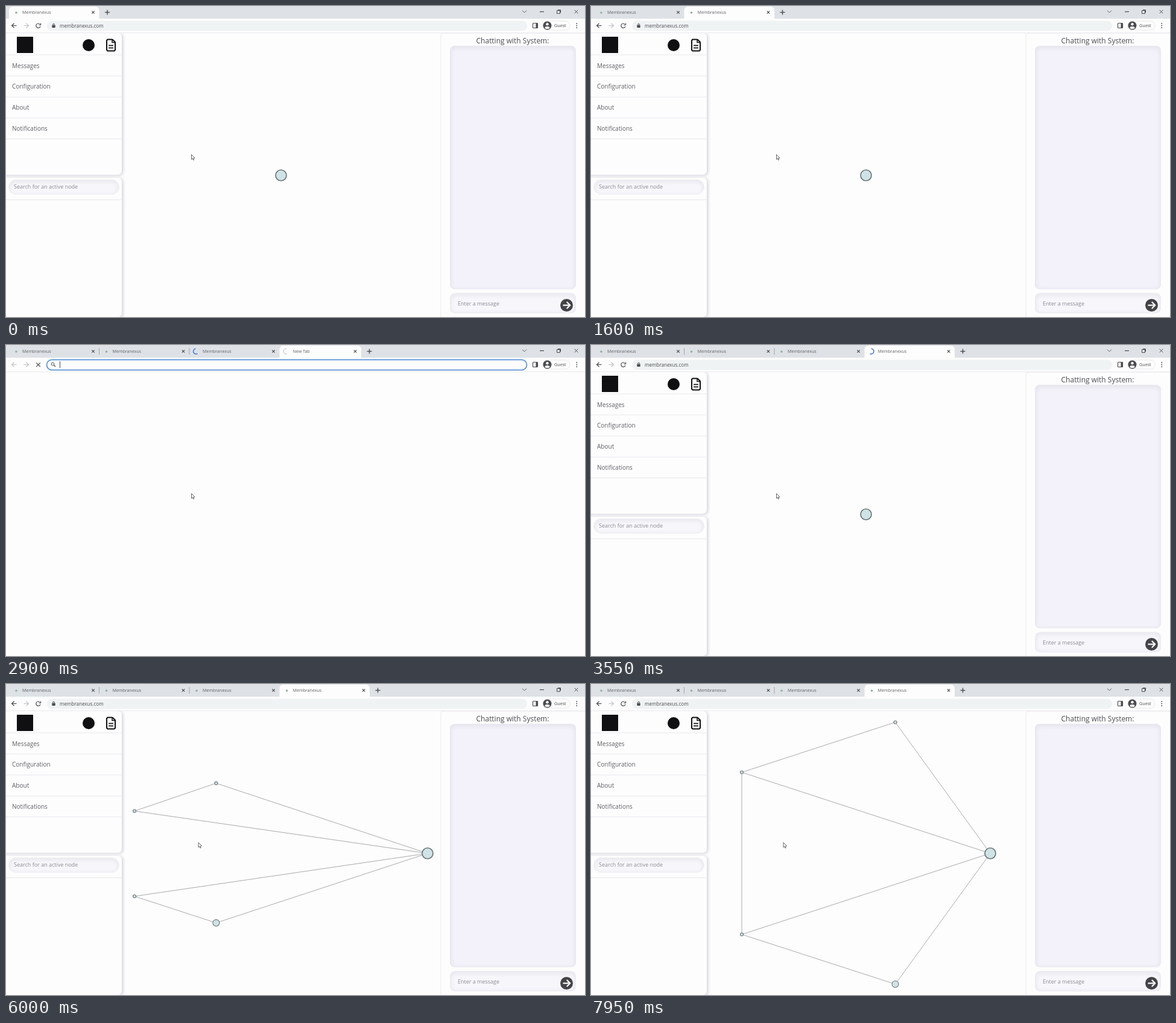
An HTML page with a canvas that plays this animation: 960 by 516 pixels, repeating every 8000 ms.

```html
<!DOCTYPE html>
<html lang="en">
<head>
<meta charset="utf-8">
<title>Browser tabs joining a network</title>
<style>
html, body { margin: 0; width: 100%; height: 100%; overflow: hidden; background: #fdfdfd; }
canvas { display: block; }
</style>
</head>
<body>
<canvas id="stage" width="960" height="516"></canvas>
<script>
const ctx = document.getElementById('stage').getContext('2d');
const LOOP = 8000, TAB = 149.5, TAU = Math.PI * 2;
const PAPER = '#fdfdfd', STRIP = '#dee2e6', FIELD = '#f0f3f4', INK = '#4b4c50', SOFT = '#606166';
const RULE = '#e9e9ee', FAINT = '#c3c4c8', HINT = '#8b8b92', BLACK = '#101012', BLUE = '#4384d0';
const UI = '"Open Sans", sans-serif', ROBOTO = 'Roboto, sans-serif';
const openings = [-3000, 600, 1950, 2800];   // when each tab is opened
const LOAD = 700;                            // from opening a tab to its page

const clamp = v => Math.max(0, Math.min(1, v));
const easeOut = (v, power) => 1 - (1 - clamp(v)) ** power;
const mix = (a, b, k) => a + (b - a) * k;

function text(str, x, y, size, color = INK, font = UI, align = 'left', weight = 400) {
  ctx.font = `${weight} ${size}px ${font}`;
  ctx.textAlign = align;
  ctx.fillStyle = color;
  ctx.fillText(str, x, y);
}
function line(points, color = INK, width = 1) {
  ctx.beginPath();
  for (let i = 0; i < points.length; i += 2) ctx.lineTo(points[i], points[i + 1]);
  ctx.strokeStyle = color;
  ctx.lineWidth = width;
  ctx.stroke();
}
function paint(fill, stroke, width = 1) {
  if (fill) { ctx.fillStyle = fill; ctx.fill(); }
  if (stroke) { ctx.strokeStyle = stroke; ctx.lineWidth = width; ctx.stroke(); }
}
function circle(x, y, r, fill, stroke, width) {
  ctx.beginPath();
  ctx.arc(x, y, r, 0, TAU);
  paint(fill, stroke, width);
}
function box(x, y, w, h, r, fill, stroke, width) {
  ctx.beginPath();
  ctx.roundRect(x, y, w, h, r);
  paint(fill, stroke, width);
}
function arc(x, y, r, from, to, color, width) {
  ctx.beginPath();
  ctx.arc(x, y, r, from, to);
  paint(null, color, width);
}
function cross(x, y, r, width = 1.2) {
  line([x - r, y - r, x + r, y + r], INK, width);
  line([x - r, y + r, x + r, y - r], INK, width);
}
function shadowed(color, blur, dx, dy, draw) {
  ctx.save();
  Object.assign(ctx, { shadowColor: color, shadowBlur: blur, shadowOffsetX: dx, shadowOffsetY: dy });
  draw();
  ctx.restore();
}
function sunkenBox(x, y, w, h, r, fill) {
  box(x, y, w, h, r, fill);
  ctx.save();
  ctx.clip();
  shadowed('#c4c4d0', 7, 0, 2, () => box(x - 1, y - 1, w + 2, h + 2, r, null, '#dcdce6', 2));
  ctx.restore();
}

function spinner(x, age) {
  const blue = age >= LOAD;
  const start = age * .004 * Math.PI + (blue ? Math.PI / 2 : 0);
  arc(x, 10.5, 4.4, start, start + 1.15 * Math.PI, blue ? '#4f82d4' : '#b4bcc4', blue ? 1.7 : 1);
}

function tabStrip(t, opened) {
  ctx.fillStyle = STRIP;
  ctx.fillRect(0, 0, 960, 21);
  const last = opened.length - 1;
  let right = 5;
  opened.forEach((start, i) => {
    const age = t - start, left = 5 + TAB * i, width = TAB * easeOut(age / 185, 3);
    right = left + width;
    if (i === last) box(left, 1, width, 22, [6, 6, 0, 0], PAPER);
    else if (i < last - 1) line([right, 5, right, 16], '#a0a2a8');
    if (width < 40) return;
    if (age < 1000) spinner(left + 11, age);
    else circle(left + 12, 11, 1.8, '#8fb29a');
    text(age < LOAD ? 'New Tab' : 'Membranexus', left + 22, 13, 7.1, SOFT);
    cross(right - 10, 10.5, 2.2);
  });
  const plus = right + 13.5;
  line([plus - 4, 10.5, plus + 4, 10.5], INK, 1.4);
  line([plus, 6.5, plus, 14.5], INK, 1.4);
  line([856, 7.5, 859.5, 11, 863, 7.5], SOFT);
  line([885, 9.5, 892, 9.5], INK, 1.2);
  box(913.5, 7.5, 5, 5, 0, null, INK);
  line([915, 6.5, 919.5, 6.5, 919.5, 11], INK);
  cross(945.5, 9.5, 2.8, 1);
}

function arrow(x, dir, color) {
  line([x - 4 * dir, 32.5, x + 4 * dir, 32.5], color, 1.2);
  line([x, 28.7, x + 4 * dir, 32.5, x, 36.3], color, 1.2);
}
function magnifier(x, y) {
  circle(x - 1, y - 1, 2.4, null, INK);
  line([x + 1, y + 1, x + 3.5, y + 3.5], INK, 1.3);
}

function toolbar(age) {
  const loaded = age >= LOAD;
  ctx.fillStyle = PAPER;
  ctx.fillRect(0, 21, 960, 23);
  line([0, 44.5, 960, 44.5], RULE);
  arrow(13.5, -1, loaded ? INK : FAINT);
  arrow(33.5, 1, FAINT);
  if (loaded) {
    arc(53.5, 32.7, 3.6, .3, 5.4, INK, 1.2);
    line([57.5, 28.5, 57.5, 31.5, 54.5, 31.5], INK, 1.2);
  } else cross(53.5, 32.7, 3.4);

  if (age < 170) {
    box(67.5, 24.5, 796, 17, 8.5, PAPER, BLUE, 1.5);
    magnifier(78.5, 32.5);
    line([89.5, 27, 89.5, 38]);
  } else if (age >= 350) {
    box(68, 24.5, 796, 17, 8.5, FIELD);
    if (loaded) {
      box(76.3, 31.5, 5.4, 4.5, .8, INK);
      arc(79, 31.2, 1.7, Math.PI, TAU, INK, 1);
    } else {
      circle(78.7, 32.7, 3.7, null, INK, 1);
      line([78.7, 32, 78.7, 35]);
      line([78.7, 30.3, 78.7, 31.3]);
    }
    text('membranexus.com', 89, 35.8, 8.05);
  }
  box(873.5, 28.5, 8, 8, 1, null, INK, 1.2);
  box(878.5, 28.5, 3.5, 8, 0, INK);
  box(890, 25, 45, 15, 7.5, null, RULE);
  circle(897.5, 32.5, 7, INK);
  circle(897.5, 30.3, 2.2, PAPER);
  ctx.beginPath();
  ctx.ellipse(897.5, 36, 4, 2, 0, 0, TAU);
  paint(PAPER);
  text('Guest', 909, 35.3, 7.2);
  for (const y of [29, 32.5, 36]) circle(946.3, y, .9, INK);
}

function globe(x, y) {
  circle(x, y, 4, INK);
  circle(x - 1.5, y + 1, 1.1, PAPER);
  circle(x + 1.4, y - 1.5, 1, PAPER);
}

function suggestions() {
  shadowed('#bcbcc4', 7, 0, 3, () => box(64, 25, 804, 72, 4, PAPER));
  ctx.fillStyle = '#e8eaed';
  ctx.fillRect(64, 44, 804, 24);
  ctx.fillStyle = BLUE;
  ctx.fillRect(64, 44, 2, 24);
  globe(78.7, 32.7);
  globe(78.7, 56);
  magnifier(78.5, 79.5);
  text('https://membranexus.com/', 96, 35.8, 8.15);
  line([200.7, 27, 200.7, 38]);
  text('https://membranexus.com', 96, 59, 8.2, '#3566c0', UI, 'left', 700);
  text('https://membranexus.com/', 96, 82.8, 8.15);
  text('- Tavoro Search', 203.5, 82.8, 8.1, '#7c7d82');
}

function guestPage() {
  text("You're browsing as a Guest", 480, 121, 17, '#2c2d30', ROBOTO, 'center');
  [
    "Pages you view in this window won't appear in the browser history",
    "and they won't leave other traces, like cookies, on the computer",
    'after you close all open Guest windows. Any files you download will',
    'be preserved, however.'
  ].forEach((row, i) => text(row, 352, 147.5 + i * 12.7, 8.45, '#38393c', ROBOTO));
  text('Learn more', 480, 224, 8, '#4a7cc8', ROBOTO, 'center');
}

function sidebar() {
  shadowed('#cfcfda', 5, 2, 1, () => {
    box(-4, 45, 196, 235, [0, 6, 6, 0], PAPER);
    box(-4, 285, 196, 231, [0, 6, 6, 0], PAPER);
  });
  for (const y of [81, 116, 151, 186, 220.5, 321.5]) line([0, y, 191, y], RULE);
  ctx.fillStyle = BLACK;
  ctx.fillRect(18, 51, 27, 27);
  circle(137, 65, 10, BLACK);
  line([176.5, 55.5, 168.5, 55.5, 167, 57, 167, 73, 168.5, 74.5, 179.5, 74.5, 181, 73, 181, 60, 176.5, 55.5], BLACK, 2);
  line([176, 55.5, 176, 60.5, 181, 60.5], BLACK, 1.5);
  for (const y of [65.5, 69.5]) line([170, y, 178, y], BLACK, 1.7);
  ['Messages', 'Configuration', 'About', 'Notifications'].forEach((name, i) =>
    text(name, 10, 102.7 + i * 34.7, 10, SOFT));
  sunkenBox(4.5, 288, 183, 25, 12.5, '#f7f7fb');
  text('Search for an active node', 13, 303, 9, HINT);
}

function chat() {
  box(721, 45, 245, 476, 5, PAPER, RULE);
  text('Chatting with System:', 840, 62, 12, INK, UI, 'center');
  sunkenBox(736, 66, 209, 404, 8, '#f3f2fa');
  sunkenBox(736, 476.5, 209, 33, 8, '#f6f6fb');
  text('Enter a message', 749, 496.7, 9, HINT);
  circle(929.5, 496.5, 10.5, '#444448');
  line([923.5, 496.5, 935, 496.5], PAPER, 2.2);
  line([929.8, 491, 935.2, 496.5, 929.8, 502], PAPER, 2.2);
}

// Offsets from the middle of the view: self, top, upper left, lower left, bottom.
const squeezed = [[243, 0], [-108, -116], [-243, -70], [-243, 71], [-108, 115]];
const pentagon = [[206, 0], [48.5, -217.5], [-206, -134.5], [-206, 134.5], [48.5, 217]];
const radii = [9, 2.5, 2.5, 2.5, 5.5];
const links = [[0, 1], [1, 2], [0, 2], [0, 3], [3, 4], [4, 0]];

function network(t) {
  const cx = 456, cy = 281;
  const node = (x, y, r) => circle(x, y, r, '#cfe3e6', '#6c7678', r > 6 ? 1.7 : 1.1);
  if (t < 5100) return node(cx, cy, 9);
  const spread = mix(.25, 1, easeOut((t - 5100) / 900, 2));
  const k = easeOut((t - 6000) / 700, 2);
  const shape = squeezed.map(([x, y], i) =>
    [mix(x, pentagon[i][0], k), mix(y * spread, pentagon[i][1], k)]);
  const reach = axis => Math.max(...shape.map(p => Math.abs(p[axis])));
  const zoom = Math.min(243 / reach(0), 217.5 / reach(1));   // keep the graph fitted to the view
  const points = shape.map(([x, y]) => [cx + x * zoom, cy + y * zoom]);
  const joined = t > 6050 ? [...links, [2, 3]] : links;
  for (const [a, b] of joined) line([...points[a], ...points[b]], '#a9a9ac');
  points.forEach(([x, y], i) => node(x, y, radii[i]));
}

function pointer(t) {
  const k = clamp((t - 4400) / 150);
  const x = mix(307.5, 319, k), y = mix(246.5, 263, k);
  ctx.beginPath();
  for (const [dx, dy] of [[0, 0], [0, 8], [1.8, 6.4], [3, 9.2], [4.3, 8.6], [3.1, 6], [5.5, 5.7]])
    ctx.lineTo(x + dx, y + dy);
  ctx.closePath();
  paint(PAPER, '#55565a', .9);
}

function draw(t) {
  const opened = openings.filter(start => t >= start);
  const age = t - opened[opened.length - 1];
  ctx.fillStyle = PAPER;
  ctx.fillRect(0, 0, 960, 516);
  if (age >= LOAD) {
    network(t);
    sidebar();
    chat();
  } else if (age >= 300) guestPage();
  tabStrip(t, opened);
  toolbar(age);
  if (age >= 170 && age < 350) suggestions();
  pointer(t);
}

const begin = performance.now();
function tick() {
  draw((performance.now() - begin) % LOOP);
  requestAnimationFrame(tick);
}
tick();
</script>
</body>
</html>
```
